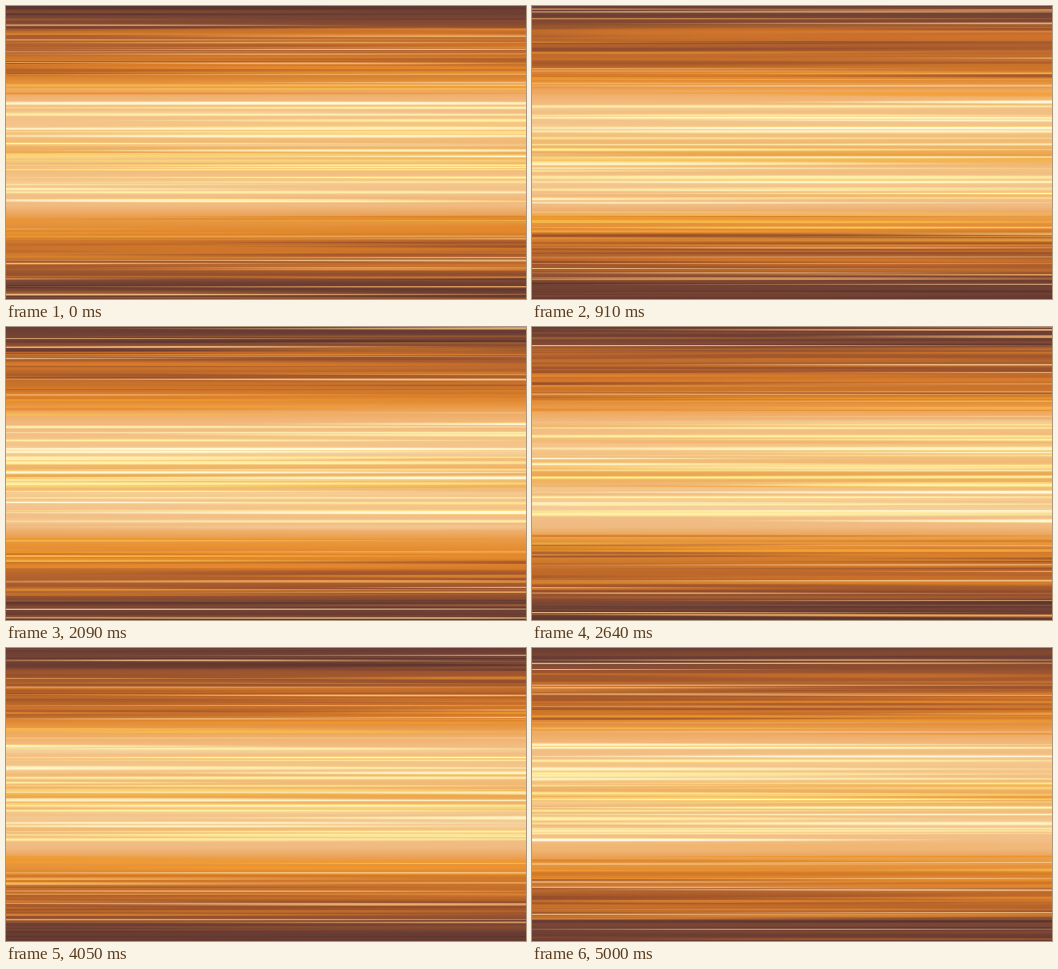
These frames come from a looping animation (520 px wide and 293 px high, 5.05 s). An HTML page with a canvas:

```html
<!DOCTYPE html>
<html lang="en">
<head>
<meta charset="utf-8">
<title>Speed lines</title>
<style>
  html, body { margin: 0; width: 100%; height: 100%; overflow: hidden; background: #b8662a; }
  canvas { display: block; width: 100%; height: 100%; }
</style>
</head>
<body>
<canvas width="520" height="293"></canvas>
<script>
const W = 520, H = 293, LOOP = 5050, FPS = 22;
const ctx = document.querySelector('canvas').getContext('2d');

// Background glow: height, colour
const glow = ctx.createLinearGradient(0, 0, 0, H);
[
  [0, '#6a3e35'], [14, '#7a4634'], [24, '#9c552e'], [42, '#b2622e'],
  [56, '#c6702b'], [67, '#cf772a'], [75, '#e38d36'], [86, '#efaa62'],
  [96, '#f2ba7e'], [122, '#f4c68c'], [139, '#f0b66e'], [148, '#eba750'],
  [157, '#f0b771'], [176, '#f4c68e'], [200, '#f0ba80'], [212, '#e99c48'],
  [226, '#e0872c'], [238, '#c9722b'], [250, '#b2622d'], [266, '#9c552e'],
  [277, '#784536'], [H, '#65392f']
].forEach(([y, color]) => glow.addColorStop(y / H, color));

// Random streaks: top, bottom, count, thickest, opacity, colours
const bands = [
  [0, 20, 3, 9, 0.5, ['#57332f', '#663a33', '#8a4c2e']],
  [24, 70, 6, 12, 0.45, ['#e58428', '#9a4f28', '#a85728', '#d9772a']],
  [206, 264, 7, 12, 0.45, ['#e58428', '#9a4f28', '#f0962c', '#c86e28']],
  [276, H, 3, 9, 0.5, ['#57332f', '#663a33', '#8a4c2e']],
  [95, 202, 10, 9, 0.5, ['#f5cb96', '#f0b46a', '#f6d4a0']],
  [0, 24, 9, 3, 0.7, ['#54332f', '#8a4c2e', '#663a33', '#a9622f']],
  [22, 74, 20, 3.4, 0.7, ['#a0542a', '#e88c2e', '#cc742a', '#8e4a2c']],
  [64, 90, 6, 3, 0.7, ['#f39d2b', '#e58728', '#f9c04c']],
  [136, 160, 6, 3.6, 0.8, ['#ec9a32', '#f5b548', '#fbd878']],
  [208, 236, 12, 3, 0.7, ['#f39d2b', '#d17a24', '#ee9228', '#f9c04c']],
  [228, 272, 18, 3.4, 0.7, ['#a0542a', '#e88c2e', '#cc742a', '#8e4a2c']],
  [270, H, 9, 3, 0.7, ['#54332f', '#8a4c2e', '#663a33', '#a9622f']],
  [0, 90, 12, 1.8, 0.85, ['#f0bc80', '#f6c88c', '#eca75c']],
  [206, H, 12, 1.8, 0.85, ['#f0bc80', '#f6c88c', '#eca75c']]
];
const brightRows = [97, 101, 108, 113, 121, 126, 131, 137, 144,
  151, 158, 164, 171, 177, 183, 187, 193];

function seeded(seed) {
  return () => {
    seed = seed + 0x6D2B79F5 | 0;
    let n = Math.imul(seed ^ seed >>> 15, 1 | seed);
    n = n + Math.imul(n ^ n >>> 7, 61 | n) ^ n;
    return ((n ^ n >>> 14) >>> 0) / 4294967296;
  };
}

// Long horizontal lens, pointed and fading at both ends
function streak(x, y, half, thick, color, alpha) {
  const fade = ctx.createLinearGradient(x - half, 0, x + half, 0);
  fade.addColorStop(0, color + '00');
  fade.addColorStop(0.4, color);
  fade.addColorStop(0.6, color);
  fade.addColorStop(1, color + '00');
  ctx.globalAlpha = alpha;
  ctx.fillStyle = fade;
  ctx.beginPath();
  ctx.moveTo(x - half, y);
  ctx.quadraticCurveTo(x, y - thick, x + half, y);
  ctx.quadraticCurveTo(x, y + thick, x - half, y);
  ctx.fill();
}

function draw(index) {
  const rnd = seeded(index * 7919 + 17);
  const between = (a, b) => a + (b - a) * rnd();
  const pick = list => list[Math.floor(rnd() * list.length)];

  ctx.globalAlpha = 1;
  ctx.fillStyle = glow;
  ctx.fillRect(0, 0, W, H);

  for (const [top, bottom, count, thick, alpha, colors] of bands) {
    for (let i = 0; i < count; i++) {
      const x = between(-100, 620), y = between(top, bottom);
      const half = between(300, 700), size = between(0.4, 1) * thick;
      const color = pick(colors);
      // Wide streaks get a soft edge from nested layers
      const layers = thick > 5 ? 4 : 1;
      for (let n = 1; n <= layers; n++) {
        streak(x, y, half, size * n / layers, color, alpha / Math.sqrt(layers));
      }
    }
  }

  function shine(y, thick) {
    const x = between(-100, 620), half = between(350, 800);
    streak(x, y, half, thick + 2, pick(['#fdd878', '#fbe19a', '#fddf84']), 0.6);
    streak(x, y, half, thick, pick(['#fffce4', '#fff3a8', '#fff6cc']), 0.9);
  }
  for (const y of brightRows) shine(y + between(-1.5, 1.5), between(0.6, 3));
  for (let i = 0; i < 7; i++) shine(between(95, 198), between(0.5, 1.4));
}

const start = performance.now();
let shown = -1;

function play() {
  // Frame changes fall on whole hundredths of a second
  const t = Math.floor((performance.now() - start) % LOOP / 10) * 10;
  const index = Math.floor((t + 5) * FPS / 1000);
  if (index !== shown) draw(shown = index);
  requestAnimationFrame(play);
}
play();
</script>
</body>
</html>
```
